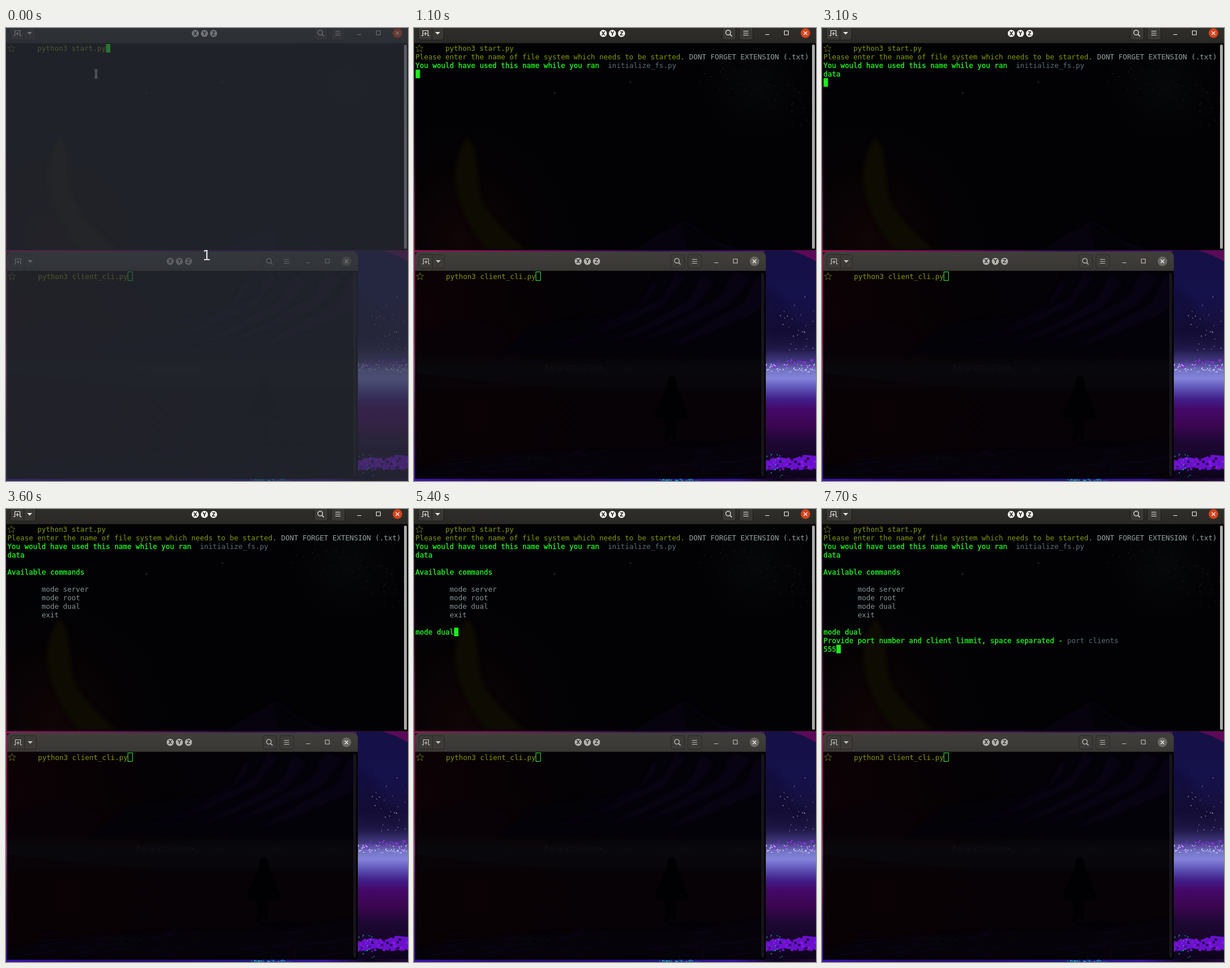
Recreate the animation shown at these times as an HTML page with a canvas. Size 705x794 px, loop 8000 ms.

```html
<!DOCTYPE html>
<html lang="en">
<head>
<meta charset="utf-8">
<title>Two terminals</title>
<style>
  html, body { margin: 0; width: 100%; height: 100%; overflow: hidden; background: #000; }
  canvas { display: block; }
</style>
</head>
<body>
<canvas id="stage" width="705" height="794"></canvas>
<script>
const W = 705, H = 794, LOOP = 8000;
const CELL = 7.5, ROW = 15;
const OLIVE = '#859900', GREEN = '#1ef51e', PALE = '#93a1a1', GRAY = '#839496', SLATE = '#586e75';
const stage = document.getElementById('stage').getContext('2d');
const sceneCanvas = Object.assign(document.createElement('canvas'), { width: W, height: H });
const scene = sceneCanvas.getContext('2d');

let seed = 7;
const random = () => (seed = (seed * 16807) % 2147483647) / 2147483647;
const between = (a, b) => a + (b - a) * random();

function rect(g, x, y, w, h, color) {
  g.fillStyle = color;
  g.fillRect(x, y, w, h);
}

function disc(g, x, y, r, color) {
  g.fillStyle = color;
  g.beginPath();
  g.arc(x, y, r, 0, 7);
  g.fill();
}

function round(g, x, y, w, h, r, fill, stroke) {
  g.beginPath();
  g.roundRect(x, y, w, h, r);
  if (fill) { g.fillStyle = fill; g.fill(); }
  if (stroke) { g.strokeStyle = stroke; g.lineWidth = 1; g.stroke(); }
}

function shape(g, path, fill, blur = 0) {
  g.filter = blur ? `blur(${blur}px)` : 'none';
  g.fillStyle = fill;
  g.fill(new Path2D(path));
  g.filter = 'none';
}

function line(g, path, color, width = 1) {
  g.strokeStyle = color;
  g.lineWidth = width;
  g.stroke(new Path2D(path));
}

function linear(g, x0, y0, x1, y1, stops) {
  const gradient = g.createLinearGradient(x0, y0, x1, y1);
  stops.forEach(stop => gradient.addColorStop(...stop));
  return gradient;
}

const vertical = (g, y0, y1, stops) =>
  linear(g, 0, y0, 0, y1, stops.map(([y, color]) => [(y - y0) / (y1 - y0), color]));

function glow(g, x, y, r, color) {
  const gradient = g.createRadialGradient(x, y, 0, x, y, r);
  gradient.addColorStop(0, color);
  gradient.addColorStop(1, 'transparent');
  rect(g, x - r, y - r, 2 * r, 2 * r, gradient);
}

function clipped(g, x, y, w, h, draw) {
  g.save();
  g.beginPath();
  g.rect(x, y, w, h);
  g.clip();
  draw();
  g.restore();
}

function specks(g, count, x0, x1, y0, y1, color, size = 1) {
  for (let i = 0; i < count; i++) {
    g.globalAlpha = between(0.3, 1);
    rect(g, between(x0, x1), between(y0, y1), size, size, color);
  }
  g.globalAlpha = 1;
}

function print(g, x, baseline, text, color) {
  g.font = '12.46px "DejaVu Sans Mono", monospace';
  g.textAlign = 'left';
  g.fillStyle = g.strokeStyle = color;
  g.fillText(text, x, baseline);
  if (color === GREEN) {
    g.lineWidth = 0.35;
    g.strokeText(text, x, baseline);
  }
}

function promptStar(g, x, y) {
  g.beginPath();
  for (let i = 0; i < 10; i++) {
    const r = i % 2 ? 3 : 6.8, a = i * Math.PI / 5 - Math.PI / 2;
    g.lineTo(x + r * Math.cos(a), y + r * Math.sin(a));
  }
  g.closePath();
  g.strokeStyle = '#5d6a0c';
  g.lineWidth = 1;
  g.stroke();
}

function desktop(g) {
  rect(g, 0, 0, W, H, '#0a0312');
  rect(g, 0, 0, 2, H, vertical(g, 0, H, [
    [0, '#16041c'], [230, '#4a0838'], [300, '#7a1060'], [389, '#a0125c'], [540, '#8c1048'],
    [600, '#8a3070'], [700, '#5c0c60'], [H, '#3a10a0']]));
  rect(g, 0, 389, W, 4, linear(g, 0, 0, W, 0,
    [[0, '#a0125c'], [0.3, '#760f58'], [0.6, '#341050'], [0.85, '#4a0f62'], [1, '#7a0d62']]));

  clipped(g, 615, 390, 90, 404, () => {
    rect(g, 615, 390, 90, 404, vertical(g, 390, 794, [
      [390, '#151046'], [470, '#15114a'], [530, '#17103c'], [565, '#251d50'], [585, '#423a80'],
      [600, '#7474c4'], [614, '#8484dc'], [632, '#5c52b4'], [650, '#41208a'], [668, '#440868'],
      [695, '#3c0652'], [725, '#1e0834'], [794, '#0a0418']]));
    shape(g, 'M660 390L684 398 705 409V390Z', '#5c0a58');
    shape(g, 'M617 452L640 470 668 520 705 548V560H617Z', 'rgba(12,8,38,.3)', 5);
    specks(g, 26, 638, 705, 465, 570, '#b4a4b8', 1.6);
    specks(g, 40, 617, 705, 580, 594, '#8a30dc', 3);
    specks(g, 60, 617, 705, 588, 602, '#dcd8ff', 1.8);
    shape(g, 'M617 758L640 752 662 756 684 748 705 750V770L676 775 650 770 617 776Z', '#6a10cc');
    specks(g, 30, 617, 705, 752, 774, '#8a18ee', 4);
    specks(g, 25, 617, 705, 742, 794, '#160526', 4);
    specks(g, 22, 617, 645, 745, 790, '#1f8eb0', 2);
  });
  rect(g, 0, 789, W, 5, linear(g, 0, 0, W, 0,
    [[0, '#3c12a8'], [0.2, '#2a0c70'], [0.45, '#2c0c78'], [0.62, '#1c1a80'], [0.8, '#38109a'], [0.9, '#10051e'], [1, '#24083e']]));
  specks(g, 45, 430, 500, 790, 794, '#20a8b8', 2);
}

function titleButtons(g, middle, left, search, border, face, ink) {
  const top = middle - 12.5;
  const box = (x, w) => round(g, x + 0.5, top + 0.5, w, 24, 4, face, border);
  box(left, 45);
  box(search - 12, 24);
  box(search + 18, 24);
  line(g, `M${left + 24.5} ${top + 1}v23`, border);
  const x = left + 12;
  line(g, `M${x - 6} ${middle + 4.5}h2.5v-9h9v9h2.5M${x + 1} ${middle - 2}v6M${x - 2} ${middle + 1}h6`, ink, 1.2);
  shape(g, `M${left + 30} ${middle - 2}h9l-4.5 4.5z`, ink);
  g.beginPath();
  g.arc(search - 1, middle - 1, 4.2, 0, 7);
  g.strokeStyle = ink;
  g.lineWidth = 1.3;
  g.stroke();
  line(g, `M${search + 2} ${middle + 2}l3.5 3.5`, ink, 1.5);
  line(g, `M${search + 25.5} ${middle - 3.5}h9m-9 3.5h9m-9 3.5h9`, ink, 1.2);
}

function titleLetters(g, x, y, color, ink) {
  g.font = 'bold 9px "DejaVu Sans", sans-serif';
  g.textAlign = 'center';
  [...'XYZ'].forEach((letter, i) => {
    disc(g, x + 16 * i, y, 6.2, color);
    g.fillStyle = ink;
    g.fillText(letter, x + 16 * i, y + 3.3);
  });
}

function windowControls(g, minimize, maximize, close, y, closeColor, ink) {
  line(g, `M${minimize - 3.5} ${y + 2.5}h7M${maximize - 3.5} ${y - 4}h7v7h-7z`, ink, 1.1);
  disc(g, close, y, 8.4, closeColor);
  line(g, `M${close - 3} ${y - 3}l6 6m0-6l-6 6`, '#f4f2ee', 1.4);
}

function upperWindow(g) {
  rect(g, 1.5, 0, 704, 389.5, '#020205');
  clipped(g, 2, 27, 703, 362, () => {
    glow(g, 80, 370, 260, '#100406');
    glow(g, 600, 100, 150, '#07080a');
    shape(g, 'M93 191C80 208 70 242 72 270C76 310 98 352 128 389H196C168 364 138 336 124 310C108 280 114 230 104 205Z', '#0d0b02', 3);
    shape(g, 'M385 389L430 360 458 346 470 337 490 345 512 366 535 375 580 389Z', '#06030e', 1);
    shape(g, 'M468 340L486 347 510 368 545 389H480Z', '#030206');
    specks(g, 120, 10, 690, 40, 270, '#17171c');
    for (let i = 0; i < 170; i++) {
      const u = random();
      disc(g, 500 + u * 205, 60 + u * 90 + between(-35, 35), between(0.4, 1), '#17191b');
    }
    disc(g, 246.5, 114, 2.2, '#18181d');
    disc(g, 379.5, 95, 2, '#18181d');
  });
  rect(g, 0, 0, W, 27, vertical(g, 0, 27, [[0, '#2f2e2b'], [27, '#292825']]));
  rect(g, 0, 26, W, 1, '#171614');
  titleButtons(g, 9, 7, 552, '#1b1a18', '#393834', '#e8e6e1');
  titleLetters(g, 332, 9.5, '#f4f2ee', '#262522');
  windowControls(g, 619.5, 653, 686.5, 9, '#d6431a', '#f0eee9');
  round(g, 698, 29, 5, 358, 2.5, '#aaa9a7');
  promptStar(g, 9.5, 36);
}

function lowerWindow(g) {
  round(g, 2, 392, 615, 398, [8, 8, 0, 0], '#040207');
  clipped(g, 2, 426, 614, 363, () => {
    glow(g, 20, 500, 380, '#110206');
    glow(g, 110, 680, 320, '#0e0206');
    shape(g, 'M2 540L50 522 95 511 140 522 175 545 150 575 2 582Z', '#080206', 2);
    shape(g, 'M145 572L205 528 270 512 345 504 395 480 428 432 440 426H616V575Z', '#040209', 2);
    [[420, 440], [460, 426], [505, 432], [560, 426], [602, 436]].forEach(([x, y], i) =>
      shape(g, `M${x} ${y}l-22 45l-80 45l-${90 - i * 8} 35l70-24l90-40l38-48z`, '#080312', 2));
    shape(g, 'M215 518L275 512 330 530 250 546 190 550Z', '#030206', 1);
    rect(g, 2, 570, 614, 75, vertical(g, 570, 645, [[570, '#08070c00'], [595, '#09080c'], [625, '#08060a'], [645, '#05030700']]));
    specks(g, 130, 225, 335, 590, 600, '#1b191b', 1.3);
    specks(g, 80, 330, 600, 578, 600, '#15131a', 1.3);
    shape(g, 'M2 606Q150 622 330 640L616 634V789H2Z', 'rgba(8,2,6,.65)');
    shape(g, 'M2 770Q180 738 330 740T616 715V789H2Z', '#05020a', 2);
    for (let i = 0; i < 45; i++) {
      const x = between(30, 600), y = between(735, 785);
      line(g, `M${x} ${y}l${between(10, 38)} ${between(-8, 2)}`, '#0a0413', 2);
    }
    specks(g, 55, 180, 235, 748, 768, '#06120f', 2);
    specks(g, 50, 440, 520, 755, 785, '#06120f', 2);
    shape(g, 'M452 610C445 610 443 620 444 630C436 640 430 665 420 681L440 686 442 712 437 724H447L450 700 453 718 459 722 458 686 484 683C472 660 468 638 460 630C461 618 459 610 452 610Z', '#010103');
    shape(g, 'M440 727L495 722 530 730 480 738Z', '#030106');
  });
  round(g, 2, 392, 615, 34, [8, 8, 0, 0], vertical(g, 392, 426, [[392, '#403f3b'], [426, '#383733']]));
  rect(g, 2, 425, 615, 1, '#22211f');
  titleButtons(g, 409, 8, 462, '#292825', '#3c3b37', '#c2c0ba');
  titleLetters(g, 288, 409, '#b5b3ae', '#353430');
  windowControls(g, 530, 563.5, 597, 409, '#6a6863', '#c8c6c0');
  round(g, 609, 429, 5, 357, 2.5, '#161519');
  promptStar(g, 10.5, 435.5);
  print(g, 3.5 + 7 * CELL, 440, 'python3 client_cli.py', OLIVE);
  g.strokeStyle = '#32cf32';
  g.lineWidth = 1.2;
  g.strokeRect(213.8, 427.5, 8, 15);
}

// Output lines: phase in which they appear, row, column, text, colour.
const OUTPUT = [
  [0, 0, 7, 'python3 start.py', OLIVE],
  [2, 1, 0, 'Please enter the name of file system which needs to be started.', OLIVE],
  [2, 1, 64, 'DONT FORGET EXTENSION (.txt)', PALE],
  [2, 2, 0, 'You would have used this name while you ran', GREEN],
  [2, 2, 45, 'initialize_fs.py', SLATE],
  [3, 3, 0, 'data', GREEN],
  [4, 5, 0, 'Available commands', GREEN],
  [4, 7, 8, 'mode server', GRAY],
  [4, 8, 8, 'mode root', GRAY],
  [4, 9, 8, 'mode dual', GRAY],
  [4, 10, 8, 'exit', GRAY],
  [5, 12, 0, 'mode dual', GREEN],
  [5, 13, 0, 'Provide port number and client limmit, space separated -', GREEN],
  [5, 13, 57, 'port clients', SLATE],
];
const INPUT_ROWS = [0, 1, 3, 4, 12, 14];

// Session steps: start time, phase, typed text, cursor visible.
const SESSION = [
  [0, 0, ' '.repeat(23), true],
  [1000, 1, '', true],
  [1100, 2, '', true],
  [1700, 2, '', false],
  [2300, 2, 'd', true],
  [2500, 2, 'da', true],
  [2600, 2, 'dat', true],
  [2800, 2, 'data', true],
  [3100, 3, '', true],
  [3500, 4, '', true],
  [3600, 4, '', false],
  [4300, 4, 'mo', true],
  [4400, 4, 'mod', true],
  [4700, 4, 'mode ', true],
  [4900, 4, 'mode d', true],
  [5200, 4, 'mode dua', true],
  [5400, 4, 'mode dual', true],
  [6000, 4, 'mode dual', false],
  [6100, 4, 'mode dual', true],
  [6500, 5, '', true],
  [6700, 5, '', false],
  [7300, 5, '', true],
  [7500, 5, '5', true],
  [7700, 5, '555', true],
];

function printCell(row, col, text, color) {
  print(stage, 2.5 + col * CELL, 40 + row * ROW, text, color);
}

function pointer(g, x, y) {
  const beam = `M${x - 2.5} ${y - 6.5}h5M${x - 2.5} ${y + 6.5}h5M${x} ${y - 6.5}v13`;
  line(g, beam, '#fff', 3);
  line(g, beam, '#111', 1);
}

function countdown(g) {
  rect(g, 0, 0, W, H, 'rgba(46,51,60,.65)');
  g.font = '24px "DejaVu Sans", sans-serif';
  g.textAlign = 'center';
  g.fillStyle = '#dcdde4';
  g.fillText('1', 352, 407);
}

function draw(t) {
  stage.drawImage(sceneCanvas, 0, 0);
  const [, phase, typed, cursorOn] = SESSION.findLast(step => step[0] <= t);
  const row = INPUT_ROWS[phase];
  for (const [from, ...cell] of OUTPUT) if (from <= phase) printCell(...cell);
  printCell(row, 0, typed, GREEN);
  if (cursorOn) rect(stage, 2.75 + typed.length * CELL, 28 + row * ROW, 7.75, 15, '#18f018');
  if (t < 1000) pointer(stage, 158, 80.5);
  if (t < 500) countdown(stage);
}

desktop(scene);
upperWindow(scene);
lowerWindow(scene);

const start = performance.now();
function tick() {
  draw((performance.now() - start) % LOOP);
  requestAnimationFrame(tick);
}
tick();
</script>
</body>
</html>
```
